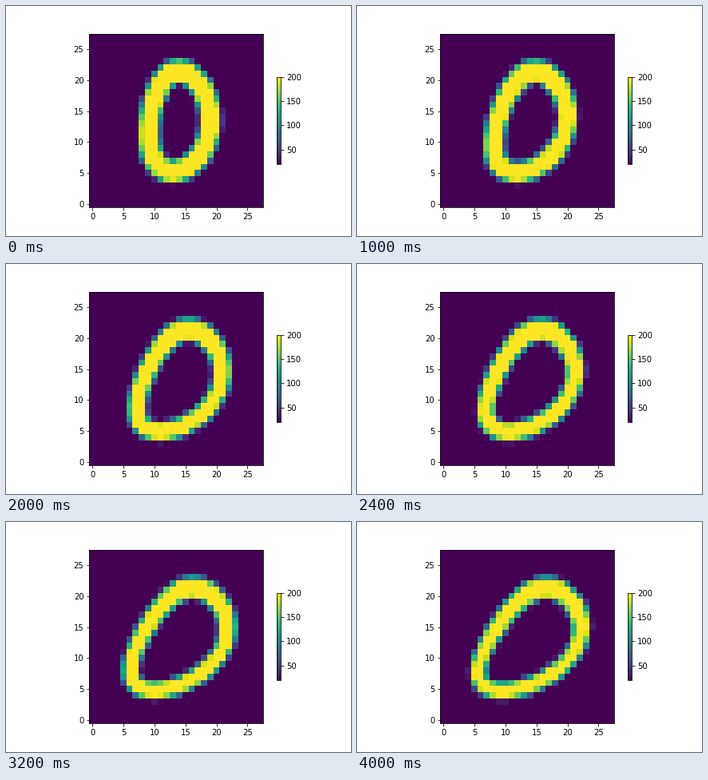
A matplotlib script for the animation above (4.2 s loop, 432 px wide and 288 px high).

```python
import numpy as np
import matplotlib.pyplot as plt
from matplotlib.animation import FuncAnimation

FRAMES = 21
INTERVAL = 200
SIZE = 28
EDGE = 1.5  # width of the soft stroke border, in cells


def zero_image(frame):
    """A pen stroke along a closed oval that widens and leans to the right."""
    t = frame / (FRAMES - 1)
    progress = t * (1.4 - 0.4 * t)

    def blend(start, end):
        return start + (end - start) * progress

    angle = np.linspace(0, 2 * np.pi, 240, endpoint=False)
    sin, cos = np.sin(angle), np.cos(angle)
    sin2, cos2 = np.sin(2 * angle), np.cos(2 * angle)

    x = (blend(13.8, 13.9) + blend(4.88, 7.2) * cos + blend(0.5, 3.5) * sin
         + blend(0.35, 0.85) * cos2 - blend(0.2, 0.6) * sin2)
    y = blend(13.33, 13.03) + blend(8.03, 8.27) * sin
    half_width = blend(1.62, 1.3) - 0.11 * cos2 + blend(0.04, 0.2) * sin

    rows, cols = np.mgrid[:SIZE, :SIZE][..., None]
    depth = (half_width - np.hypot(cols - x, rows - y)).max(axis=-1)
    return 255 * np.clip(0.5 + depth / EDGE, 0, 1)


plt.rcParams["font.family"] = "DejaVu Sans"
fig, ax = plt.subplots(figsize=(6, 4), dpi=72)
fig.subplots_adjust(left=0.125, right=0.9, bottom=0.125, top=0.88)
image = ax.imshow(zero_image(0), origin="lower", cmap="viridis",
                  vmin=20, vmax=200, interpolation="nearest")
ax.set_xticks(range(0, SIZE, 5))
ax.set_yticks(range(0, SIZE, 5))
fig.colorbar(image, ax=ax, shrink=0.5, ticks=range(50, 201, 50))


def update(frame):
    image.set_data(zero_image(frame))
    return [image]


animation = FuncAnimation(fig, update, frames=FRAMES, interval=INTERVAL,
                          repeat=True, repeat_delay=0)
plt.show()
```
